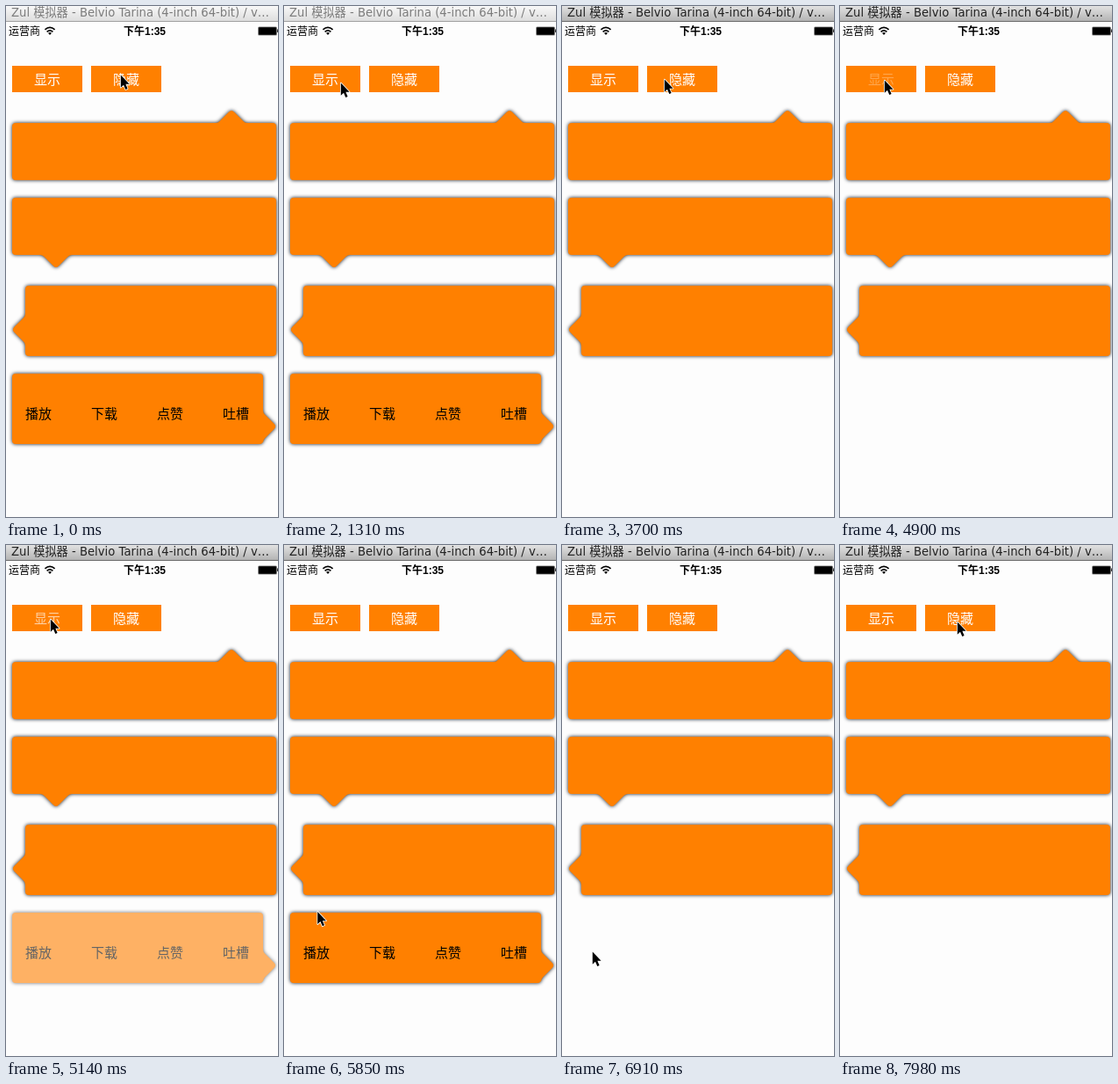
Animation, 310 px wide and 581 px high, one loop 8000 ms. Source, as an HTML page:

```html
<!DOCTYPE html>
<html lang="zh-CN">
<head>
<meta charset="utf-8">
<title>气泡菜单</title>
<style>
  html, body { margin: 0; width: 100%; height: 100%; overflow: hidden; background: #fdfdfd; }
  svg { display: block; width: 310px; height: 581px; }
  text { font-family: "Liberation Sans", "Noto Sans CJK SC", "Noto Sans CJK", sans-serif; }
  .title { font: 13.2px "DejaVu Sans", "Noto Sans CJK SC", "Noto Sans CJK", sans-serif; }
  .status { font-size: 12px; }
  .label { font-size: 15px; font-weight: 300; text-anchor: middle; }
  .fill { fill: #ff8000; }
</style>
</head>
<body>
<svg viewBox="0 0 310 581" xmlns="http://www.w3.org/2000/svg">
  <defs>
    <linearGradient id="idle" x2="0" y2="1">
      <stop offset="0" stop-color="#f8f8f8"/><stop offset="1" stop-color="#dedede"/>
    </linearGradient>
    <linearGradient id="active" x2="0" y2="1">
      <stop offset="0" stop-color="#e2e2e2"/><stop offset="1" stop-color="#b4b4b4"/>
    </linearGradient>
    <filter id="glow" filterUnits="userSpaceOnUse" x="0" y="100" width="310" height="420"
            color-interpolation-filters="sRGB">
      <feDropShadow dx="0" dy="0" stdDeviation="2" flood-color="#0c121c"/>
    </filter>
  </defs>

  <rect width="310" height="581" fill="#fdfdfd"/>

  <rect id="bar" width="310" height="17"/>
  <rect id="edge" y="17" width="310" height="1"/>
  <text class="title" id="title" x="6" y="12">Zul 模拟器 - Belvio Tarina (4-inch 64-bit) / v…</text>

  <text class="status" x="3" y="32.5">运营商</text>
  <g fill="none" stroke="#000" stroke-width="1.7">
    <path d="M44.4 26.9Q50 21.9 55.6 26.9M46.6 29.3Q50 26.3 53.4 29.3"/>
    <path d="M48 30.8Q50 29.2 52 30.8L50 33Z" fill="#000" stroke="none"/>
  </g>
  <text class="status" x="134" y="32.5" font-weight="600">下午1:35</text>
  <rect x="287" y="23.5" width="22" height="10" rx="1.5" fill="#888"/>
  <rect x="288" y="24.3" width="20" height="8.4" rx=".6"/>
  <rect x="309" y="26.5" width="1" height="3.5" fill="#333"/>

  <rect class="fill" x="7" y="68" width="80" height="30"/>
  <rect class="fill" x="97" y="68" width="80" height="30"/>
  <text class="label" id="show" x="47" y="88.7" fill="#fff">显示</text>
  <text class="label" id="hide" x="137" y="88.7" fill="#fff">隐藏</text>

  <g id="bubbles"></g>
  <g id="menu"></g>

  <path id="cursor" d="M.8 1.5V15.7L4 12.7L6.3 17.9L8.6 16.9L6.4 11.8H10.6Z"
        fill="#000" stroke="#fff" stroke-width="1.6" paint-order="stroke" stroke-linejoin="round"/>
</svg>
<script>
const LOOP = 8000;
const TICK = 119.15; // the screen refreshes once per tick; all times below are in ticks
const $ = id => document.getElementById(id);
const NS = "http://www.w3.org/2000/svg";

function add(parent, tag, attrs, text) {
  const el = document.createElementNS(NS, tag);
  for (const key in attrs) el.setAttribute(key, attrs[key]);
  if (text) el.textContent = text;
  parent.append(el);
  return el;
}

// Rounded box plus an arrow whose tip is at (tx, ty), turned by `turn` degrees.
function bubble(parent, x, y, w, h, tx, ty, turn) {
  const g = add(parent, "g", { class: "fill", filter: "url(#glow)" });
  add(g, "rect", { x, y, width: w, height: h, rx: 4 });
  add(g, "path", {
    d: "M-18 16V15Q-15 15 -13 12.5L-3 2.4Q0 -.6 3 2.4L13 12.5Q15 15 18 15V16Z",
    transform: `translate(${tx} ${ty}) rotate(${turn})`
  });
}

bubble($("bubbles"), 7, 133, 301, 65, 257, 118, 0);
bubble($("bubbles"), 7, 218, 301, 65, 57, 298, 180);
bubble($("bubbles"), 22, 318, 286, 80, 7, 368, -90);
bubble($("menu"), 7, 418, 286, 80, 308, 478, 90);
const [play] = ["播放", "下载", "点赞", "吐槽"].map((name, i) =>
  add($("menu"), "text", { class: "label", x: 37 + 75 * i, y: 468.7 }, name));

const clamp = p => Math.min(1, Math.max(0, p));
const smooth = p => clamp(p) ** 2 * (3 - 2 * clamp(p));

const home = { x: 130, y: 77 };
const moves = [
  { from: 5, to: 8, x: 69, y: 94 },
  { from: 9, to: 11, x: 64, y: 86 },
  { from: 22, to: 25, x: 116, y: 82 },
  { from: 36, to: 40, x: 50, y: 83 },
  { from: 45, to: 50, x: 36, y: 454 },
  { from: 50, to: 52, x: 34, y: 461 },
  { from: 60, to: 65, x: 149, y: 105 },
  { from: 65, to: 67, x: 133, y: 86 }
];

function cursorAt(k) {
  let { x, y } = home;
  for (const m of moves) {
    const p = smooth((k - m.from) / (m.to - m.from));
    x += (m.x - x) * p;
    y += (m.y - y) * p;
  }
  return `translate(${x} ${y})`;
}

const FADE = 3;
const fade = (k, start) => smooth((k - start) / FADE);
const menuAlpha = k => 1 - fade(k, 27.75) + fade(k, 41.3) - fade(k, 54.75);

// A label dims while held down, then recovers over two ticks.
const pressAlpha = (k, down, up) => k < down ? 1 : .3 + .7 * clamp((k - up) / 2);

function draw(t) {
  const k = Math.floor(t / TICK + .03);
  $("cursor").setAttribute("transform", cursorAt(k));
  $("menu").setAttribute("opacity", menuAlpha(k));
  $("hide").setAttribute("opacity", pressAlpha(k, 26, 28));
  $("show").setAttribute("opacity", pressAlpha(k, 41, 42));
  play.setAttribute("opacity", pressAlpha(k, 53, 55));

  const focused = k >= 18;
  $("title").setAttribute("fill", focused ? "#222" : "#7c7c7c");
  $("bar").setAttribute("fill", focused ? "url(#active)" : "url(#idle)");
  $("edge").setAttribute("fill", focused ? "#6a6a6a" : "#a0a0a0");
}

const start = performance.now();
function tick() {
  draw((performance.now() - start) % LOOP);
  requestAnimationFrame(tick);
}
draw(0);
requestAnimationFrame(tick);
</script>
</body>
</html>
```
